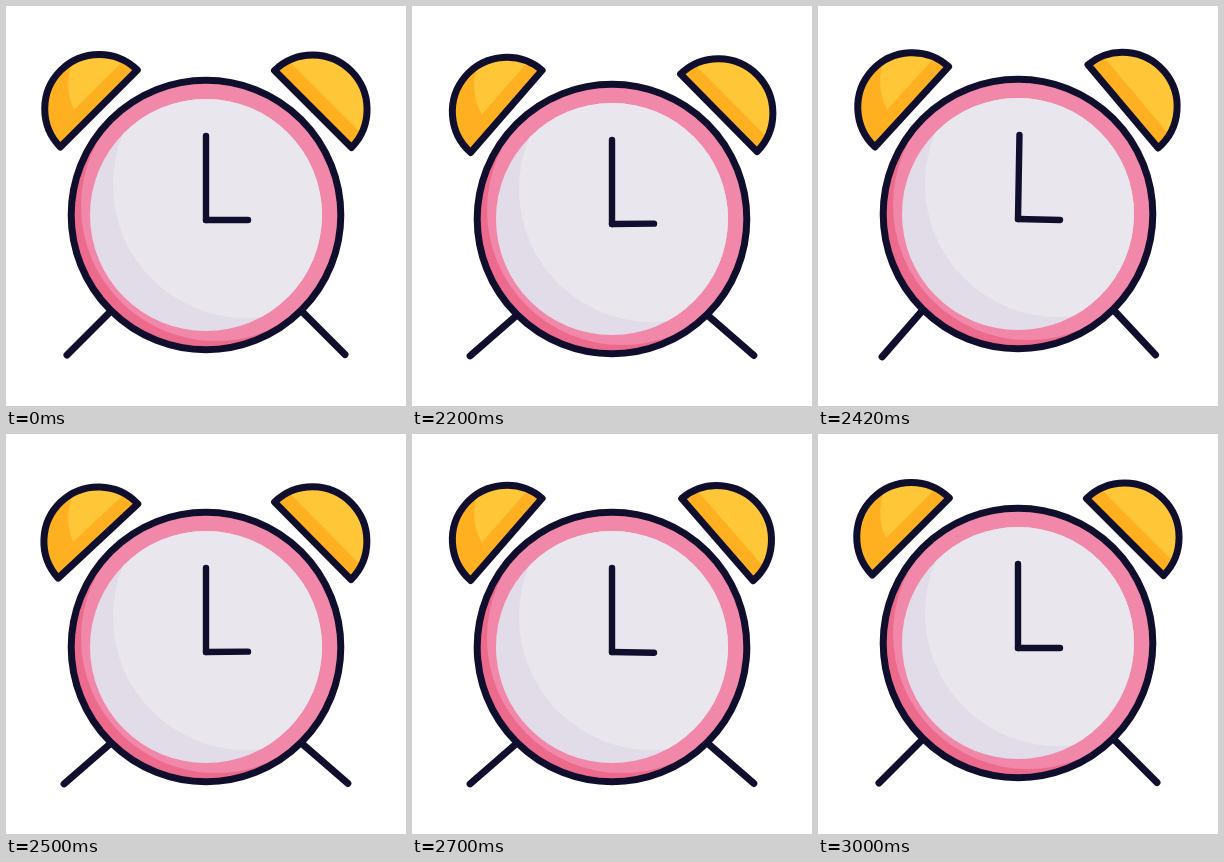
These frames come from a looping animation (400 px wide and 400 px high, 3.02 s). An HTML page:

```html
<!DOCTYPE html>
<html lang="en">
<head>
<meta charset="utf-8">
<title>Alarm clock</title>
<style>
  html, body { margin: 0; width: 100%; height: 100%; overflow: hidden; background: #fff; }
  svg { display: block; width: 100vw; height: 100vh; }
  .line { fill: none; stroke: #0f0f2d; stroke-width: 7; stroke-linecap: round; stroke-linejoin: round; }
  .hand { stroke-width: 6.4; }
  .gold { fill: #ffc738; }
  .amber { fill: #ffb021; }
</style>
</head>
<body>
<svg viewBox="0 0 400 400">
  <defs>
    <path id="domeL" d="M54.3 141A54.45 54.45 0 0 1 131.3 64Z"/>
    <path id="domeR" d="M268.5 64.5A54.45 54.45 0 0 1 345.5 141.5Z"/>
    <clipPath id="clipL"><use href="#domeL"/></clipPath>
    <clipPath id="clipR"><use href="#domeR"/></clipPath>
    <clipPath id="clipBody"><circle cx="200" cy="209" r="135"/></clipPath>
    <clipPath id="clipFace"><circle cx="200" cy="209" r="116"/></clipPath>
  </defs>
  <g id="clock">
    <path id="legL" class="line" d="M110 300L61 349"/>
    <path id="legR" class="line" d="M290 299.5L339 348.5"/>
    <g id="bellL">
      <use href="#domeL" class="amber"/>
      <path class="gold" clip-path="url(#clipL)" d="M68 104A59 59 0 0 1 72 46V40H132Z"/>
      <use href="#domeL" class="line"/>
    </g>
    <g id="bellR">
      <use href="#domeR" class="amber"/>
      <path class="gold" clip-path="url(#clipR)" d="M268 40L368 140V40Z"/>
      <use href="#domeR" class="line"/>
    </g>
    <circle cx="200" cy="209" r="135" fill="#ec6b8d"/>
    <circle cx="210" cy="200" r="135" fill="#f288a9" clip-path="url(#clipBody)"/>
    <circle cx="200" cy="209" r="116" fill="#e2dce8"/>
    <circle cx="240" cy="179" r="133" fill="#eae6ee" clip-path="url(#clipFace)"/>
    <circle cx="200" cy="209" r="134.8" class="line"/>
    <path id="minute" class="line hand" d="M200 214V130"/>
    <path id="hour" class="line hand" d="M200 214H242"/>
  </g>
</svg>
<script>
const LOOP = 3020, REST = 2000, STEP = 25, FPS = 60, LAST = 60;
const el = id => document.getElementById(id);

// Goes from 0 to a at frame `first`, then swings b, a, b... every `gap` frames and back to 0.
const shake = (first, gap, a, b) => frame => {
  if (frame <= 0 || frame >= LAST) return 0;
  if (frame < first) return a * frame / first;
  const n = Math.floor((frame - first) / gap);
  const start = first + n * gap, end = Math.min(start + gap, LAST);
  const [from, next] = n % 2 ? [b, a] : [a, b];
  const to = end === LAST ? 0 : next;
  return from + (to - from) * (frame - start) / (end - start);
};

const bounce = shake(3, 3, -6, 4);

// id, pivot x, pivot y, direction, shake in degrees
const parts = [
  ["legL", 104, 306, 1, shake(3, 3, -12, 4)],
  ["legR", 297, 306.5, -1, shake(3, 3, -8, 4)],
  ["bellL", 78, 79, -1, shake(3, 4, 7, -5)],
  ["bellR", 326, 80, 1, shake(1, 4, 5.8, -1.4)],
  ["minute", 200, 214, 1, shake(3, 3, 2, 0)],
  ["hour", 200, 214, 1, shake(1, 4, 1.7, -1.2)]
];

function draw() {
  const t = performance.now() % LOOP;
  // Ticks of 25 ms, shown on a 10 ms grid
  const tick = Math.floor((Math.floor(t / 10) * 10 + 5) / STEP);
  const frame = (tick * STEP - REST) * FPS / 1000;
  el("clock").setAttribute("transform", `translate(0 ${bounce(frame)})`);
  for (const [id, x, y, dir, turn] of parts)
    el(id).setAttribute("transform", `rotate(${dir * turn(frame)} ${x} ${y})`);
  requestAnimationFrame(draw);
}
draw();
</script>
</body>
</html>
```
